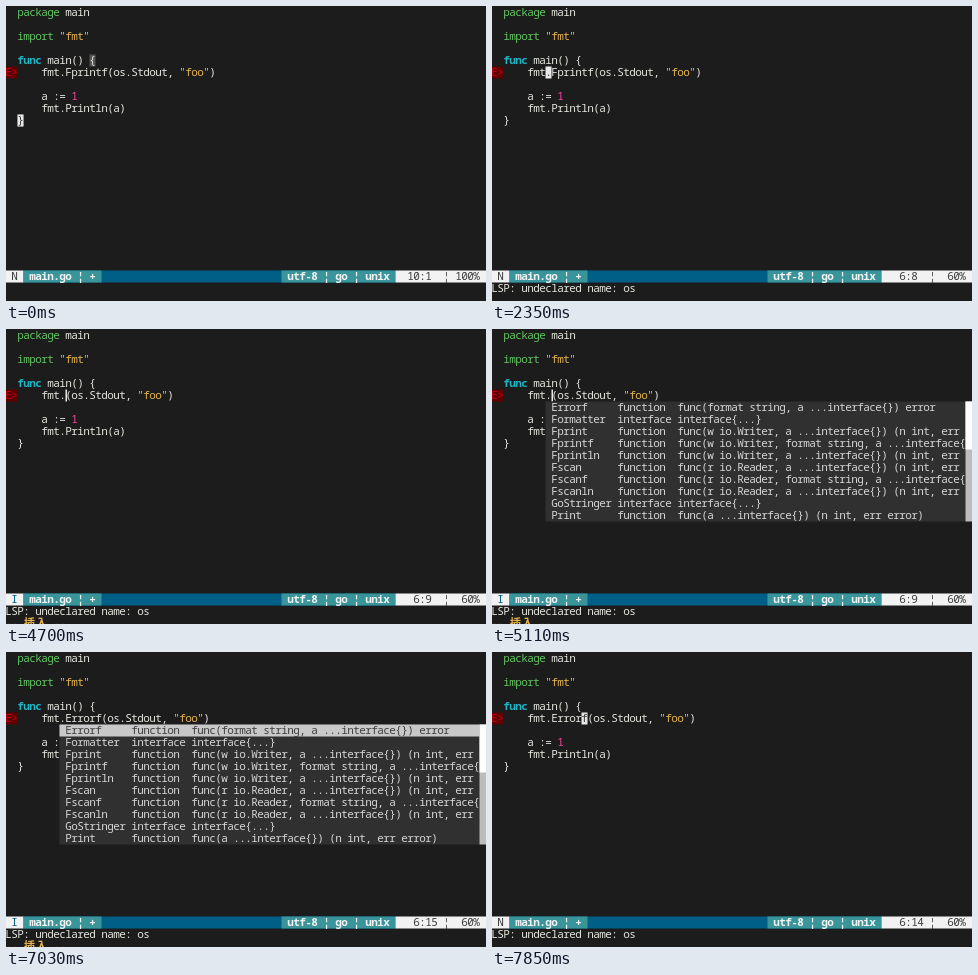
An HTML page with a canvas that plays this animation: 480 px wide and 295 px high, repeating every 8 s.

```html
<!DOCTYPE html>
<html lang="en">
<head>
<meta charset="utf-8">
<title>Editor completion</title>
<style>
html, body { margin: 0; width: 100%; height: 100%; overflow: hidden; background: #1c1c1c; }
canvas { display: block; width: 480px; height: 295px; }
</style>
</head>
<body>
<canvas id="screen"></canvas>
<script>
const W = 480, H = 295, CW = 6, CH = 12, LEFT = -0.5, TOP = 0.5, LOOP = 8000;
const canvas = document.getElementById('screen');
const ctx = canvas.getContext('2d');
const dpr = window.devicePixelRatio || 1;
canvas.width = Math.round(W * dpr);
canvas.height = Math.round(H * dpr);

const C = {
  bg: '#1c1c1c', fg: '#e4e4de', green: '#62c462', cyan: '#1fb5c4', gold: '#e6b450',
  pink: '#f8449a', signBg: '#5f0000', sign: '#c8000f', paren: '#555555', cursor: '#e8e8e8',
  menu: '#303030', menuFg: '#d6d6d6', pick: '#c8c8c8', pickFg: '#404040',
  thumb: '#ffffff', track: '#bcbcbc',
  light: '#f2f2f2', dark: '#3a3a3a', teal: '#3a959b', blue: '#005f87', plain: '#444444'
};

const FN = 'function', IO = 'interface';
const REST = 'a ...interface{}) (n int, err error)';
const ITEMS = [
  ['Errorf', FN, 'func(format string, a ...interface{}) error'],
  ['Formatter', IO, 'interface{...}'],
  ['Fprint', FN, 'func(w io.Writer, ' + REST],
  ['Fprintf', FN, 'func(w io.Writer, format string, ' + REST],
  ['Fprintln', FN, 'func(w io.Writer, ' + REST],
  ['Fscan', FN, 'func(r io.Reader, ' + REST],
  ['Fscanf', FN, 'func(r io.Reader, format string, ' + REST],
  ['Fscanln', FN, 'func(r io.Reader, ' + REST],
  ['GoStringer', IO, 'interface{...}'],
  ['Print', FN, 'func(' + REST]
];

// Each step changes part of the editor state. Cursor is [line, column], both from 1.
const STEPS = [
  [0, { mode: 'N', call: 'Fprintf', at: [10, 1], pos: [10, 1], on: true, parens: [[5, 13], [10, 1]],
        msg: '', cmd: '', insert: false, menu: '', pick: -1, plain: false }],
  [340, { on: false }],
  [590, { on: true }],
  [960, { cmd: '4' }],
  [1140, { cmd: '', at: [6, 33], pos: [6, 33], parens: [[6, 16], [6, 33]] }],
  [1610, { msg: 'LSP: undeclared name: os' }],
  [1790, { at: [6, 4], pos: [6, 4] }],
  [1850, { parens: [] }],
  [1970, { at: [6, 5], pos: [6, 5] }],
  [2350, { at: [6, 8], pos: [6, 8] }],
  [2600, { at: [6, 9], pos: [6, 9] }],
  [2780, { at: [6, 10], pos: [6, 10] }],
  [3310, { at: [6, 11], pos: [6, 11] }],
  [3990, { on: false }],
  [4040, { on: true, cmd: 'c' }],
  [4370, { cmd: 'ci' }],
  [4580, { cmd: '', call: '', at: [6, 9] }],
  [4640, { insert: true }],
  [4690, { mode: 'I', pos: [6, 9] }],
  [5110, { menu: 'full' }],
  [5350, { on: false }],
  [5640, { on: true }],
  [6000, { on: false }],
  [6240, { call: 'Errorf', menu: 'torn' }],
  [6270, { plain: true }],
  [6330, { menu: 'full', pick: 0, plain: false, pos: [6, 15] }],
  [6380, { on: true, at: [6, 15] }],
  [7030, { on: false }],
  [7310, { on: true, at: [6, 14], menu: '', pick: -1, insert: false, msg: '' }],
  [7370, { mode: 'N', pos: [6, 14] }],
  [7850, { msg: 'LSP: undeclared name: os' }]
];

function stateAt(t) {
  const s = {};
  for (const [start, change] of STEPS) if (start <= t) Object.assign(s, change);
  return s;
}

function fill(col, row, cols, rows, color) {
  ctx.fillStyle = color;
  ctx.fillRect(col * CW, row * CH, cols * CW, rows * CH);
}

// Puts text on the character grid and returns the next free column.
function put(col, row, text, color = C.fg, bold = false) {
  ctx.fillStyle = color;
  ctx.font = (bold ? 'bold ' : '') + '11px "Noto Sans Mono", "Noto Sans CJK JP", "Noto Sans CJK", monospace';
  for (const ch of text) {
    const span = ch > '\u2fff' ? 2 : 1;
    if (ch !== ' ') ctx.fillText(ch, (col + span / 2) * CW, row * CH + 9.5);
    col += span;
  }
  return col;
}

function block(col, row, text, bg, color, bold = false) {
  fill(col, row, text.length, 1, bg);
  put(col, row, text, color, bold);
}

function codeLines(s) {
  return [
    [['package', C.green], [' main']],
    [],
    [['import', C.green], [' '], ['"fmt"', C.gold]],
    [],
    [['func', C.cyan, true], [' main() {']],
    [['    fmt.' + s.call + '(os.Stdout, '], ['"foo"', C.gold], [')']],
    [],
    [['    a := '], ['1', C.pink]],
    [['    fmt.Println(a)']],
    [['}']]
  ];
}

function drawCode(s) {
  const lines = codeLines(s);
  for (const [line, col] of s.parens) fill(col + 1, line - 1, 1, 1, C.paren);
  block(0, 5, 'E>', C.signBg, C.sign);
  lines.forEach((parts, row) => {
    let col = 2;
    for (const part of parts) col = put(col, row, ...part);
  });
  if (!s.on) return;
  const [line, col] = s.at;
  if (s.mode === 'I' && s.insert) {
    fill(col + 1, line - 1, 0.25, 1, C.cursor);
  } else {
    const text = lines[line - 1].map(p => p[0]).join('');
    block(col + 1, line - 1, text[col - 1] || ' ', C.cursor, C.dark);
  }
}

function putItem(i, color) {
  const [name, kind, type] = ITEMS[i];
  put(10, i + 6, name, color);
  put(21, i + 6, kind, color);
  put(31, i + 6, type.slice(0, 48), color);
}

function drawMenu(s) {
  if (!s.menu) return;
  const torn = s.menu === 'torn';
  const first = torn ? 4 : 0;
  if (torn) {
    fill(9, 6, 71, 4, C.bg);
    block(9, 7, ' Fo', C.menu, C.menuFg);
    block(9, 8, ' Fprint    ', C.menu, C.menuFg);
  }
  fill(9, first + 6, 70, ITEMS.length - first, C.menu);
  if (s.pick >= 0) fill(9, s.pick + 6, 70, 1, C.pick);
  for (let i = first; i < ITEMS.length; i++) putItem(i, i === s.pick ? C.pickFg : C.menuFg);
  if (torn) return;
  fill(79, 6, 2, 10, C.track);
  fill(79, 6, 2, 4, C.thumb);
}

function drawStatus(s) {
  if (s.plain) {
    fill(0, 22, 81, 1, C.plain);
    put(0, 22, 'main.go [+]');
    put(62, 22, '6,6-9');
    put(76, 22, '全て');
    return;
  }
  const [line, col] = s.pos;
  const place = String(line).padStart(3) + ':' + String(col).padEnd(2);
  const percent = (line * 10 + '%').padStart(4);
  fill(3, 22, 62, 1, C.blue);
  block(0, 22, ' ' + s.mode + ' ', C.light, s.mode === 'I' ? C.blue : C.dark);
  block(3, 22, ' main.go ¦ + ', C.teal, C.light, true);
  block(46, 22, ' utf-8 ¦ go ¦ unix ', C.teal, C.light, true);
  block(65, 22, ' ' + place + ' ¦ ' + percent + '  ', C.light, C.dark);
}

function draw(t) {
  const s = stateAt(t);
  ctx.setTransform(dpr, 0, 0, dpr, 0, 0);
  ctx.fillStyle = C.bg;
  ctx.fillRect(0, 0, W, H);
  ctx.translate(LEFT, TOP);
  ctx.textAlign = 'center';
  ctx.textBaseline = 'alphabetic';
  drawCode(s);
  drawMenu(s);
  drawStatus(s);
  put(0, 23, s.msg);
  if (s.insert) put(0, 24, '-- 插入 --', C.gold, true);
  put(69, 24, s.cmd);
}

const begin = performance.now();
function tick() {
  draw((performance.now() - begin) % LOOP);
  requestAnimationFrame(tick);
}
tick();
</script>
</body>
</html>
```
